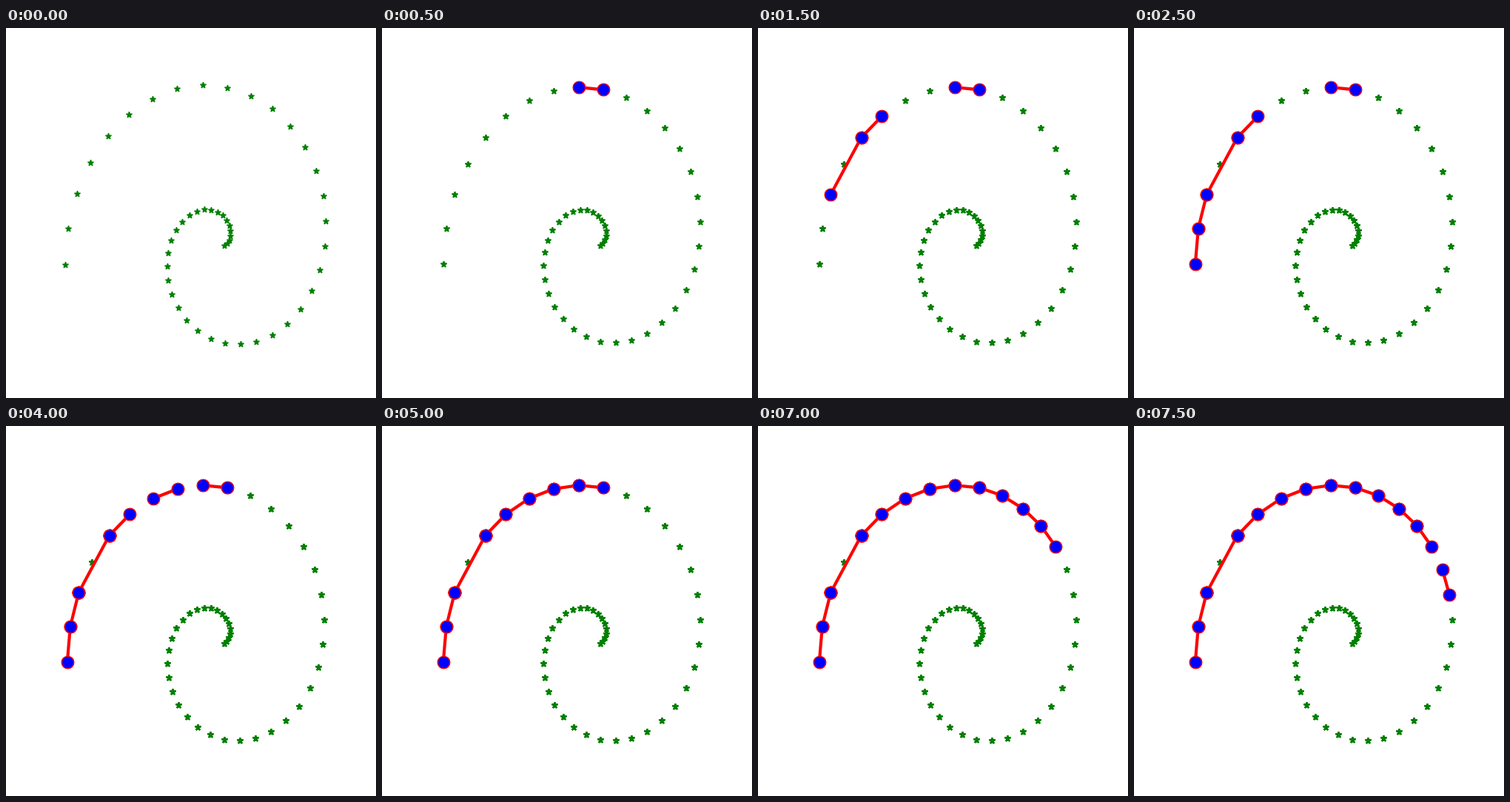
Animation of 500x500 px, one loop 8 s. Source, as an HTML page:

```html
<!DOCTYPE html>
<html lang="en">
<head>
<meta charset="utf-8">
<title>Linking spiral points</title>
<style>
  html, body { margin: 0; width: 100%; height: 100%; overflow: hidden; background: #fff; }
  svg { display: block; width: 100vw; height: 100vh; }
  .stars { fill: #008000; stroke: #008000; stroke-width: 1.39; stroke-linejoin: bevel; }
  .link line { stroke: #f00; stroke-width: 4.17; }
  .link circle { fill: #00f; stroke: #f00; stroke-width: 1.39; }
</style>
</head>
<body>
<svg id="stage" viewBox="0 0 500 500"></svg>
<script>
const STEP = 500, MAX_LAYERS = 6;
const COUNT = 50, TURN = 2 * Math.PI / 33;
const STAR_RADIUS = 4.167, INNER_RATIO = 0.382, DOT_RADIUS = 8.33;

// The plot's scale tightens slightly once linking begins
const firstView = { x: 290.97, y: 295.17, sx: 22.25, sy: 27.5 };
const mainView = { x: 290.48, y: 294.8, sx: 21.92, sy: 27.12 };

const stage = document.getElementById("stage");

function add(parent, tag, attrs) {
  const node = document.createElementNS("http://www.w3.org/2000/svg", tag);
  for (const key in attrs) node.setAttribute(key, attrs[key]);
  return parent.appendChild(node);
}

// Archimedean spiral r = angle; index 0 is the outer end
function project(index, view) {
  const angle = (COUNT - index) * TURN;
  return [
    view.x + view.sx * angle * Math.cos(angle),
    view.y - view.sy * angle * Math.sin(angle)
  ];
}

// Markers sit on pixel centres, lines do not
function markerAt(index, view) {
  return project(index, view).map(v => Math.round(v) + 0.5);
}

function starPath(cx, cy) {
  const corners = Array.from({ length: 10 }, (_, i) => {
    const radius = STAR_RADIUS * (i % 2 ? INNER_RATIO : 1);
    const angle = i * Math.PI / 5;
    return `${cx + radius * Math.sin(angle)} ${cy - radius * Math.cos(angle)}`;
  });
  return "M" + corners.join("L") + "Z";
}

function addStars(view) {
  const stars = Array.from({ length: COUNT }, (_, i) => starPath(...markerAt(i, view)));
  return add(stage, "path", { class: "stars", d: stars.join("") });
}

function addLink([a, b]) {
  const group = add(stage, "g", { class: "link" });
  const [x1, y1] = project(a, mainView);
  const [x2, y2] = project(b, mainView);
  if (a !== b) add(group, "line", { x1, y1, x2, y2 });
  for (const end of [a, b]) {
    const [cx, cy] = markerAt(end, mainView);
    add(group, "circle", { cx, cy, r: DOT_RADIUS });
  }
  return group;
}

const toNext = i => [i, i + 1];
const repeat = i => [i, i];
const chain = (...stops) => stops.slice(1).map((stop, i) => [stops[i], stop]);

// One link per step: walk to the outer end, step back, then fill in neighbours
const links = [
  toNext(8),
  ...chain(5, 4, 2, 1, 0),
  ...[2, 4].map(repeat),
  ...[6, 5, 7, 12, 10, 9, 11, 14].map(toNext)
];

const firstStars = addStars(firstView);
// Stars are painted again at each step, so their soft edges build up
const layers = Array.from({ length: MAX_LAYERS }, () => addStars(mainView));
const linkGroups = links.map(addLink);

function show(node, visible) {
  node.style.display = visible ? "" : "none";
}

function render(time) {
  const step = Math.floor(time / STEP) % (links.length + 1);
  show(firstStars, step === 0);
  layers.forEach((layer, i) => show(layer, step > 0 && i <= step));
  linkGroups.forEach((group, i) => show(group, i < step));
}

const start = performance.now();
function tick() {
  render(performance.now() - start);
  requestAnimationFrame(tick);
}
tick();
</script>
</body>
</html>
```
